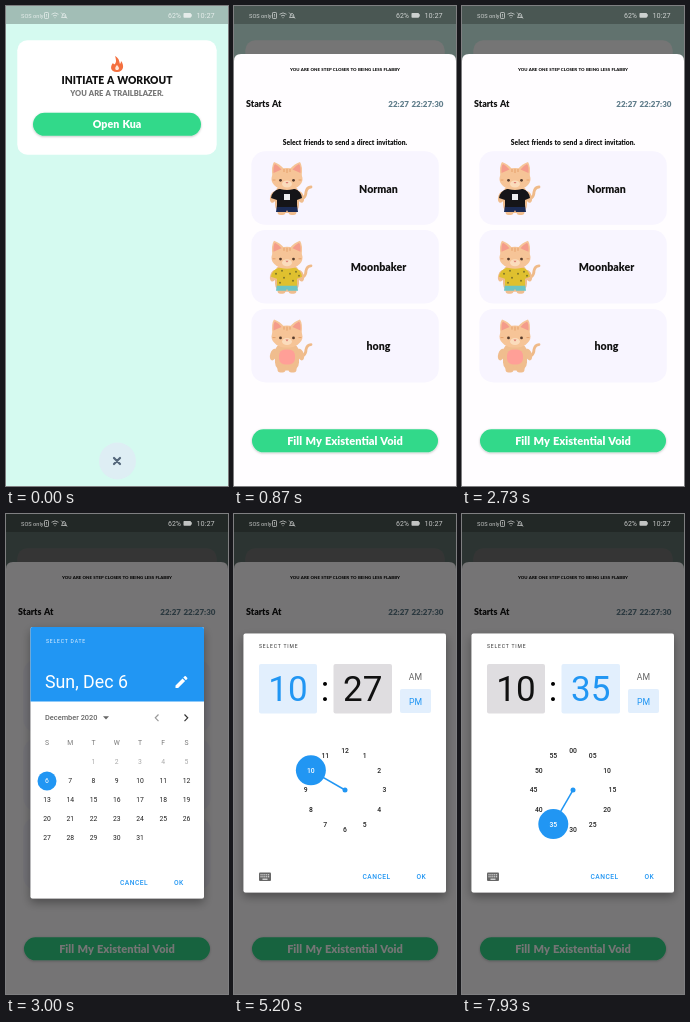
An HTML page that plays this animation: 222x480 px, repeating every 8000 ms.

```html
<!DOCTYPE html>
<html lang="en">
<head>
<meta charset="utf-8">
<title>Workout invitation</title>
<style>
html, body { margin: 0; height: 100%; overflow: hidden; background: #d5faf0 }
svg { display: block; width: 100vw; height: 100vh }
text { font-family: Roboto, sans-serif }
.r text { font-family: Lato, sans-serif; font-weight: 900; word-spacing: .08em }
.m { text-anchor: middle }
.b { fill: #2196f3; font-weight: 500; font-size: 6.7px; letter-spacing: .45px }
.cap { font-size: 5px; letter-spacing: .85px }
.big { font-size: 35px; text-anchor: middle }
.num { font-size: 6.8px; text-anchor: middle }
</style>
</head>
<body>
<svg viewBox="0 0 222 480">
  <defs>
    <filter id="shadow" x="-20%" y="-20%" width="140%" height="150%">
      <feDropShadow dx="0" dy=".8" stdDeviation=".8" flood-opacity=".25"/>
    </filter>
    <filter id="lift" x="-20%" y="-20%" width="140%" height="140%">
      <feDropShadow dx="0" dy="4" stdDeviation="5" flood-opacity=".35"/>
    </filter>
    <clipPath id="knobClip"><circle id="clipDot" r="15"/></clipPath>
    <g id="nums" class="num" font-weight="500"></g>
  </defs>

  <!-- home -->
  <rect width="222" height="480" fill="#d5faf0"/>
  <rect width="222" height="18" fill="#a2beb6"/>
  <g class="r m">
    <rect x="11.300" y="34.300" width="199.400" height="114.400" rx="10" fill="#fff"/>
    <path d="M109 50C114 53 113 56 114 58Q115 57 115 55C118.500 59 118 66 111 66C104 66 104 60 107 57Q108 59 109 58Q111 55 109 50" fill="#f4703f"/>
    <path d="M111 59Q114 62 112.500 63.500Q111 64.500 109.500 63.500Q108.500 61.500 111 59" fill="#ffe6da"/>
    <text x="111" y="77.500" font-size="10.300" fill="#111">INITIATE A WORKOUT</text>
    <text x="111" y="89.700" font-size="7.500" fill="#777">YOU ARE A TRAILBLAZER.</text>
    <rect x="27" y="106.800" width="168" height="23" rx="11.500" fill="#30d98a" filter="url(#shadow)"/>
    <text x="111" y="122.300" font-size="10.600" fill="#fff">Open Kua</text>
  </g>
  <circle cx="111.500" cy="455" r="18.500" fill="#deeef4"/>
  <path d="M108 452l6 6m0-6l-6 6" stroke="#53667a" stroke-width="2.200" stroke-linecap="round"/>
  <rect id="scrim1" width="222" height="480"/>

  <!-- invitation sheet -->
  <g id="sheet" class="r">
    <path d="M0 480V55Q0 48 7 48H215Q222 48 222 55V480Z" fill="#fffdff"/>
    <text class="m" x="111" y="65" font-size="4.350" fill="#111">YOU ARE ONE STEP CLOSER TO BEING LESS FLABBY</text>
    <text x="12" y="100.500" font-size="8.900" fill="#111">Starts At</text>
    <text x="209.500" y="100.500" font-size="8" fill="#607d8b" text-anchor="end">22:27 22:27:30</text>
    <text class="m" x="111" y="139.300" font-size="6.700" fill="#111">Select friends to send a direct invitation.</text>
    <g id="friends"></g>
    <rect x="18" y="423.300" width="186" height="23" rx="11.500" fill="#30d98a" filter="url(#shadow)"/>
    <text class="m" x="111" y="439" font-size="11" fill="#fff">Fill My Existential Void</text>
  </g>
  <rect id="scrim2" width="222" height="480"/>

  <!-- date dialog -->
  <g id="date">
    <rect x="24.500" y="113" width="173.500" height="271.500" rx="2" fill="#fff" filter="url(#lift)"/>
    <path d="M24.500 187.500V115q0-2 2-2H196q2 0 2 2V187.500Z" fill="#2196f3"/>
    <text class="cap" x="40" y="128.800" fill="#e4f2fe">SELECT DATE</text>
    <text x="39" y="174.300" font-size="17.800" fill="#fff">Sun, Dec 6</text>
    <path d="M169.500 174v-2.600l7-7 2.600 2.600-7 7zM177.300 163.600l1.300-1.300q.6-.5 1.200 0l1.400 1.400q.5.6 0 1.200l-1.300 1.300z" fill="#fff"/>
    <text x="39" y="206.300" font-size="7.400" font-weight="500" fill="#666">December 2020</text>
    <path d="M97 202.200h6l-3 3.200z" fill="#666"/>
    <g fill="none" stroke-width="1.200">
      <path d="M152.500 200.500l-3.200 3.300 3.200 3.300" stroke="#999"/>
      <path d="M178.500 200.500l3.200 3.300-3.200 3.300" stroke="#333"/>
    </g>
    <circle cx="41" cy="267" r="9.500" fill="#2196f3"/>
    <g id="days" class="num"></g>
    <text class="b" x="114" y="371.200">CANCEL</text>
    <text class="b" x="168" y="371.200">OK</text>
    <circle id="touch" cx="173.500" cy="374" r="8" fill="#8aa" opacity=".15"/>
  </g>

  <!-- time dialog -->
  <g id="time">
    <rect x="9.500" y="119.500" width="202.500" height="259" rx="2" fill="#fff" filter="url(#lift)"/>
    <text class="cap" x="25" y="134" fill="#333">SELECT TIME</text>
    <rect id="hourBox" x="25" y="150" width="58" height="49.500" rx="2"/>
    <rect id="minBox" x="99.500" y="150" width="58.500" height="49.500" rx="2"/>
    <text id="hour" class="big" x="54" y="187">10</text>
    <text class="big" x="91" y="187">:</text>
    <text id="min" class="big" x="128.700" y="187"></text>
    <rect x="166" y="175" width="31" height="24" rx="2" fill="#e2effd"/>
    <g class="m" font-size="8.700">
      <text x="181.500" y="165.500" fill="#666">AM</text>
      <text x="181.500" y="190.500" fill="#2196f3">PM</text>
    </g>
    <use href="#nums" fill="#222"/>
    <line id="hand" x1="111" y1="276" stroke="#2196f3" stroke-width="1.500"/>
    <circle cx="111" cy="276" r="2.500" fill="#2196f3"/>
    <circle id="knob" r="15" fill="#2196f3"/>
    <g clip-path="url(#knobClip)"><use href="#nums" fill="#fff"/></g>
    <rect x="25" y="358.500" width="12" height="8.500" rx="1" fill="#666"/>
    <path d="M26.500 360.800h9m-9 2h9" stroke="#fff" stroke-dasharray="1.100 .8"/>
    <path d="M28.500 365.200h5" stroke="#fff"/>
    <text class="b" x="128.500" y="365.300">CANCEL</text>
    <text class="b" x="182.500" y="365.300">OK</text>
  </g>

  <!-- status bar -->
  <g fill="#fff" opacity=".72">
    <text x="15" y="11.500" font-size="5.700">SOS only</text>
    <text x="162" y="12" font-size="7">62%</text>
    <text x="190.500" y="12" font-size="7.300">10:27</text>
    <rect x="177.500" y="7" width="7.500" height="4.800" rx=".8"/>
    <path d="M185.500 8.200v2.400" stroke="#fff" stroke-width=".8"/>
    <g fill="none" stroke="#fff" stroke-width=".8">
      <rect x="38.500" y="6.500" width="4" height="6" rx=".7"/>
      <path d="M40.500 8v1.700m0 .7v.8M45.500 8.300q3.500-2.800 7 0M47 10q2-1.600 4 0M48.500 11.700h1M55.500 11.500h5q-1-1-1-3-1.500-2.500-3 0 0 2-1 3M55 6.500l6 6"/>
    </g>
  </g>
</svg>
<script>
const $ = id => document.getElementById(id);
const set = (id, attrs) => {
  for (const k in attrs) $(id).setAttribute(k, attrs[k]);
};
const label = (x, y, s, fill) => `<text x="${x}" y="${y}"${fill ? ` fill="${fill}"` : ''}>${s}</text>`;

// Outfits sit on the same cat; y counts from the top of its card.
const shirt = fill => `<path d="M45 38H61Q67 40 68 47L63 49V56H43V49L37 47Q38 40 45 38Z" fill="${fill}"/>`;
const shorts = fill => `<path d="M43 54H63L64 61H54L53 59 52 61H42Z" fill="${fill}"/>`;
const spots = [[42, 44], [48, 41], [50, 48], [56, 44], [62, 42], [59, 51], [46, 53], [65, 46]]
  .map(([x, y]) => `<circle cx="${x}" cy="${y}" r="1" fill="#80772b"/>`).join('');
const friends = [
  ['Norman', shorts('#1b2b55') + shirt('#151518') + '<rect x="50" y="43" width="6" height="6" fill="#eee"/>'],
  ['Moonbaker', shorts('#6cc5c4') + shirt('#dfc02f') + spots],
  ['hong', '<rect x="45" y="41" width="16" height="15" rx="6" fill="#ff9f97"/>']
];
const cat = outfit => `
  <path d="M62 48Q72 49 72 41Q73 36 77 36" fill="none" stroke="#efba89" stroke-width="2.800" stroke-linecap="round"/>
  <g fill="#f0bd8e">
    <rect x="41" y="35" width="24" height="27" rx="8"/>
    <ellipse cx="39.500" cy="46" rx="3.300" ry="6" transform="rotate(18 39.500 46)"/>
    <ellipse cx="66.500" cy="46" rx="3.300" ry="6" transform="rotate(-18 66.500 46)"/>
    <rect x="43.500" y="57" width="8" height="7" rx="3"/><rect x="54.500" y="57" width="8" height="7" rx="3"/>
  </g>
  ${outfit}
  <path d="M38.500 26Q37 15 40 11Q46 13 50 18H56Q60 13 66 11Q69 15 67.500 26Z" fill="#f6c497"/>
  <ellipse cx="53" cy="28" rx="15.500" ry="11" fill="#f6c497"/>
  <path d="M39.500 22Q39 15 41 13Q45 15 47.500 18.500ZM66.500 22Q67 15 65 13Q61 15 58.500 18.500Z" fill="#f49c8b"/>
  <path d="M50 18v3m3-3v4m3-4v3M38.500 29h3m23 0h3" stroke="#e5a06b"/>
  <ellipse cx="53" cy="33" rx="5" ry="3.500" fill="#fbdcbc"/>
  <circle cx="46.500" cy="29.300" r="1.400" fill="#553a2a"/><circle cx="59.500" cy="29.300" r="1.400" fill="#553a2a"/>
  <path d="M51.500 31h3l-1.500 1.800z" fill="#d9776e"/>`;

$('friends').innerHTML = friends.map(([name, outfit], i) => `
  <g transform="translate(0 ${145 + i * 78.800})">
    <rect x="17.300" y=".3" width="187.500" height="73.500" rx="14" fill="#f8f5ff"/>${cat(outfit)}
    <text class="m" x="144.500" y="41.500" font-size="10.600" fill="#111">${name}</text>
  </g>`).join('');

const column = i => 41 + i * 23.250;
let days = [...'SMTWTFS'].map((d, i) => label(column(i), 231.300, d, '#777')).join('');
for (let d = 1; d <= 31; d++) {
  const cell = d + 1;
  days += label(column(cell % 7), 250.300 + Math.floor(cell / 7) * 19, d,
    d < 6 ? '#aaa' : d == 6 ? '#fff' : '#222');
}
$('days').innerHTML = days;

const polar = (deg, r = 39.400) => {
  const a = deg * Math.PI / 180;
  return [111 + r * Math.sin(a), 276 - r * Math.cos(a)];
};
let minuteMode = null;
function setMode(on) {
  if (on === minuteMode) return;
  minuteMode = on;
  $('nums').innerHTML = Array.from({length: 12}, (_, i) => {
    const [x, y] = polar(i * 30);
    return label(x, y + 2.400, on ? String(i * 5).padStart(2, '0') : i || 12);
  }).join('');
  const colours = active => active ? ['#e2effd', '#2196f3'] : ['#dfdde0', '#111'];
  const [hb, hf] = colours(!on), [mb, mf] = colours(on);
  set('hourBox', {fill: hb});
  set('hour', {fill: hf});
  set('minBox', {fill: mb});
  set('min', {fill: mf});
}

const ramp = (t, from, length) => Math.min(1, Math.max(0, (t - from) / length));
// cubic-bezier(x1, 0, .2, 1)
function ease(p, x1) {
  let lo = 0, hi = 1;
  for (let i = 0; i < 20; i++) {
    const s = (lo + hi) / 2, q = 1 - s;
    if (3 * x1 * s * q * q + .6 * s * s * q + s ** 3 < p) lo = s; else hi = s;
  }
  return lo * lo * (3 - 2 * lo);
}

function draw(t) {
  const rise = ease(ramp(t, 468, 250), 0);
  set('sheet', {transform: `translate(0 ${432 * (1 - rise)})`});
  set('scrim1', {opacity: .54 * rise});

  const date = ease(ramp(t, 2850, 150), 0) * (1 - ramp(t, 4920, 150));
  const time = ease(ramp(t, 4950, 150), 0);
  set('date', {opacity: date});
  set('time', {opacity: time});
  set('scrim2', {opacity: 1 - (1 - .54 * date) * (1 - .54 * time)});
  set('touch', {visibility: t >= 4800 ? 'inherit' : 'hidden'});

  setMode(t >= 6070);
  $('min').textContent = t < 7670 ? 27 : 35;
  const angle = 300 - 138 * ease(ramp(t, 6070, 200), .4) + 48 * ease(ramp(t, 7670, 200), .4);
  const [x, y] = polar(angle);
  set('hand', {x2: x, y2: y});
  set('knob', {cx: x, cy: y});
  set('clipDot', {cx: x, cy: y});
}

const start = performance.now();
function loop() {
  draw((performance.now() - start) % 8000);
  requestAnimationFrame(loop);
}
loop();
</script>
</body>
</html>
```
